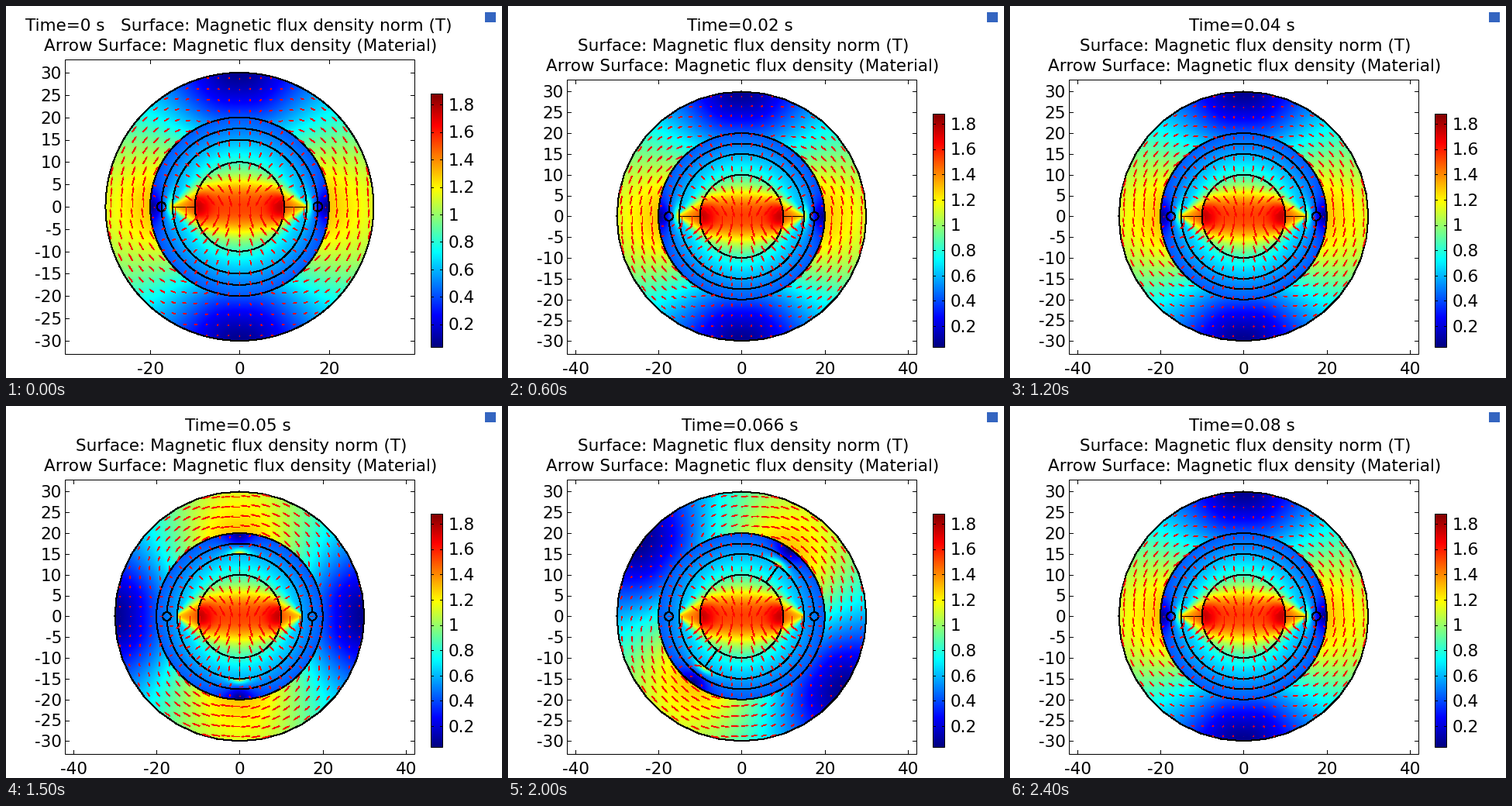
These frames come from a looping animation (640x480 px, 2500 ms). A matplotlib script:

```python
import numpy as np
import matplotlib.pyplot as plt
from matplotlib.animation import FuncAnimation
from matplotlib.collections import LineCollection, PolyCollection
from matplotlib.colors import LinearSegmentedColormap
from matplotlib.patches import Polygon, Rectangle

W, H, DPI = 640, 480, 100
FRAMES, INTERVAL = 25, 100
PT = 72 / DPI                  # points per pixel
FONT = 21.46 * PT
VMIN, VMAX = 0.035, 1.88       # tesla
OMEGA = np.radians(9000)       # rotor speed per second
LEFT, RIGHT, BOTTOM, CX = 76, 527, 449, 301.4
ARROW_GAIN = 10                # pixels per tesla

RAINBOW = LinearSegmentedColormap.from_list("rainbow", [
    (0, (0, 0, 0.5)), (0.125, (0, 0, 1)), (0.375, (0, 1, 1)),
    (0.625, (1, 1, 0)), (0.875, (1, 0, 0)), (1, (0.5, 0, 0))], N=512)

plt.rcParams["lines.antialiased"] = False


def rotor_field(x, y):
    """Core and magnets: flux runs downwards, radial inside the magnets."""
    r, xa, ya = np.hypot(x, y), np.abs(x), np.abs(y)
    k = np.clip((r - 10) / 5, 0, 1)
    base = 0.76 - 0.17 * k
    peak = np.where(r < 10, 1.53 + 0.22 * np.exp(-((xa - 9.5) / 3) ** 2),
                    1.5 - 0.25 * k)
    lens = 7.1 * np.clip(1 - (x / 15.5) ** 2, 0.04, 1)
    mag = base + (peak - base) * np.exp(-(ya / lens) ** 2.4)
    dx = -x * np.tanh(y / 3)
    dy = -np.hypot(y, 10 * np.exp(-ya / 4))
    d = np.hypot(dx, dy)
    return mag * dx / d, mag * dy / d


def field(x, y, theta):
    r, phi = np.hypot(x, y), np.arctan2(y, x)
    s, c = np.sin(phi - theta), np.cos(phi - theta)
    # air gap: a potential step on the rotor facing an iron wall
    depth = 1.2 + 0.76 * np.clip(r - 15, 0, 5)
    gap = 0.57 * 15 / np.maximum(r, 15) / np.tanh(
        np.pi / 10 * (15 * s + 1j * depth))
    # stator yoke
    k = np.clip((r - 20) / 10, 0, 1)
    yoke_r = -(0.06 + 0.36 * (1 - k) ** 1.4) * s
    yoke_t = (1.3 - 0.17 * k) * c * np.abs(c) ** 0.25
    br = np.where(r < 20, -gap.real, yoke_r)
    bt = np.where(r < 20, c * gap.imag, yoke_t)
    u = br * np.cos(phi) - bt * np.sin(phi)
    v = br * np.sin(phi) + bt * np.cos(phi)
    ru, rv = rotor_field(x, y)
    return np.where(r < 15, ru, u), np.where(r < 15, rv, v)


side = (np.arange(360) + 0.5) / 6 - 30
GX, GY = np.meshgrid(side, side[::-1])
step = np.arange(-12, 13) * 2.4
AX, AY = np.meshgrid(step, step)
inside = np.hypot(AX, AY) < 29.9
AX, AY = AX[inside], AY[inside]

fig = plt.figure(figsize=(W / DPI, H / DPI), dpi=DPI, facecolor="white")
ax = fig.add_axes([0, 0, 1, 1])


def line(xs, ys):
    ax.plot(xs, ys, color="black", lw=PT, solid_capstyle="butt")


def label(x, y, text, ha="center"):
    ax.text(x, y, text, fontsize=FONT, family="DejaVu Sans",
            ha=ha, va="baseline")


def box(x, y, w, h, **kw):
    ax.add_patch(Rectangle((x, y), w, h, **kw))


def draw_titles(n, t):
    head = f"Time={t:g} s"
    surface = "Surface: Magnetic flux density norm (T)"
    arrows = "Arrow Surface: Magnetic flux density (Material)"
    if n == 0:
        rows = [(300, head + "   " + surface), (303, arrows)]
    else:
        rows = [(299, head), (303.5, surface), (303, arrows)]
    for i, (x, text) in enumerate(rows):
        label(x, 32.5 + 26 * i, text)


def draw_frame(top, cy, scale):
    box(LEFT, top, RIGHT - LEFT, BOTTOM - top, fill=False, lw=PT, ec="black")
    for v in range(-40, 41, 20):
        x = CX + v * scale
        if LEFT < x < RIGHT:
            line([x, x], [BOTTOM, BOTTOM - 5])
            line([x, x], [top, top + 5])
            label(x + 0.4, 475, str(v))
    for v in range(-30, 31, 5):
        y = cy - v * scale
        line([LEFT, LEFT + 5], [y, y])
        line([RIGHT, RIGHT - 5], [y, y])
        label(72, y + 7.9, str(v), "right")


def draw_colorbar(top):
    x0, x1, bottom = 548, 563, 440
    ramp = np.linspace(1, 0, 512)[:, None]
    ax.imshow(ramp, cmap=RAINBOW, extent=(x0, x1, bottom, top),
              aspect="auto", zorder=1)
    box(x0, top, x1 - x0, bottom - top, fill=False, lw=PT, ec="black")
    for i in range(1, 10):
        v = i / 5
        y = bottom - (v - VMIN) / (VMAX - VMIN) * (bottom - top)
        line([x0, x0 + 3], [y, y])
        line([x1 - 3, x1], [y, y])
        label(571, y + 7.7, f"{v:g}", "left")


def draw_machine(n, theta, cy, scale):
    def px(x, y):
        return CX + np.asarray(x) * scale, cy - np.asarray(y) * scale

    def arc(r, a=0, b=2 * np.pi, x=0, count=181):
        p = np.linspace(a, b, count)
        return px(x + r * np.cos(p), r * np.sin(p))

    rim = arc(30, count=181 if n == 0 else 37)
    edge = Polygon(np.column_stack(rim), fill=False, lw=PT, ec="black",
                   antialiased=False)
    ax.add_patch(edge)

    u, v = field(GX, GY, theta)
    R = 30 * scale
    im = ax.imshow(np.hypot(u, v), cmap=RAINBOW, vmin=VMIN, vmax=VMAX,
                   extent=(CX - R, CX + R, cy + R, cy - R),
                   aspect="auto", interpolation="bilinear", zorder=0)
    im.set_clip_path(edge)

    for r in (10, 15, 20):
        line(*arc(r))
    gap = 0 if n == 0 else 1 / 17.5
    for a in (0, np.pi):
        line(*arc(17.5, a + gap, a + np.pi - gap))
    for x in (-17.5, 17.5):
        line(*arc(1, x=x, count=41))
    for sgn in (-1, 1):
        ends = sgn * np.array([10, 15])
        line(*px(ends * np.cos(theta), ends * np.sin(theta)))

    # arrows grow from their tails, heads in proportion
    u, v = field(AX, AY, theta)
    tail = np.column_stack(px(AX, AY))
    d = np.column_stack([u, -v]) * ARROW_GAIN
    tip, neck = tail + d, tail + 0.68 * d
    wing = 0.11 * np.column_stack([-d[:, 1], d[:, 0]])
    ax.add_collection(LineCollection(np.stack([tail, neck], 1), colors="red",
                                     linewidths=0.75 * PT, zorder=3))
    ax.add_collection(PolyCollection(np.stack([tip, neck + wing, neck - wing], 1),
                                     facecolors="red", edgecolors="red",
                                     linewidths=0.3 * PT, zorder=3))


def draw(n):
    ax.clear()
    t = (n * 10 // 3) / 1000
    top, cy, scale, bar = ((69, 259.0, 5.765, 113) if n == 0
                           else (95, 271.4, 5.365, 139))
    draw_machine(n, OMEGA * t, cy, scale)
    draw_frame(top, cy, scale)
    draw_colorbar(bar)
    draw_titles(n, t)
    box(618, 8, 14, 13, fc="#3465c0", lw=0)
    ax.set_xlim(0, W)
    ax.set_ylim(H, 0)
    ax.axis("off")
    return []


anim = FuncAnimation(fig, draw, frames=FRAMES, interval=INTERVAL,
                     init_func=lambda: [], repeat=True, repeat_delay=0)
plt.show()
```
